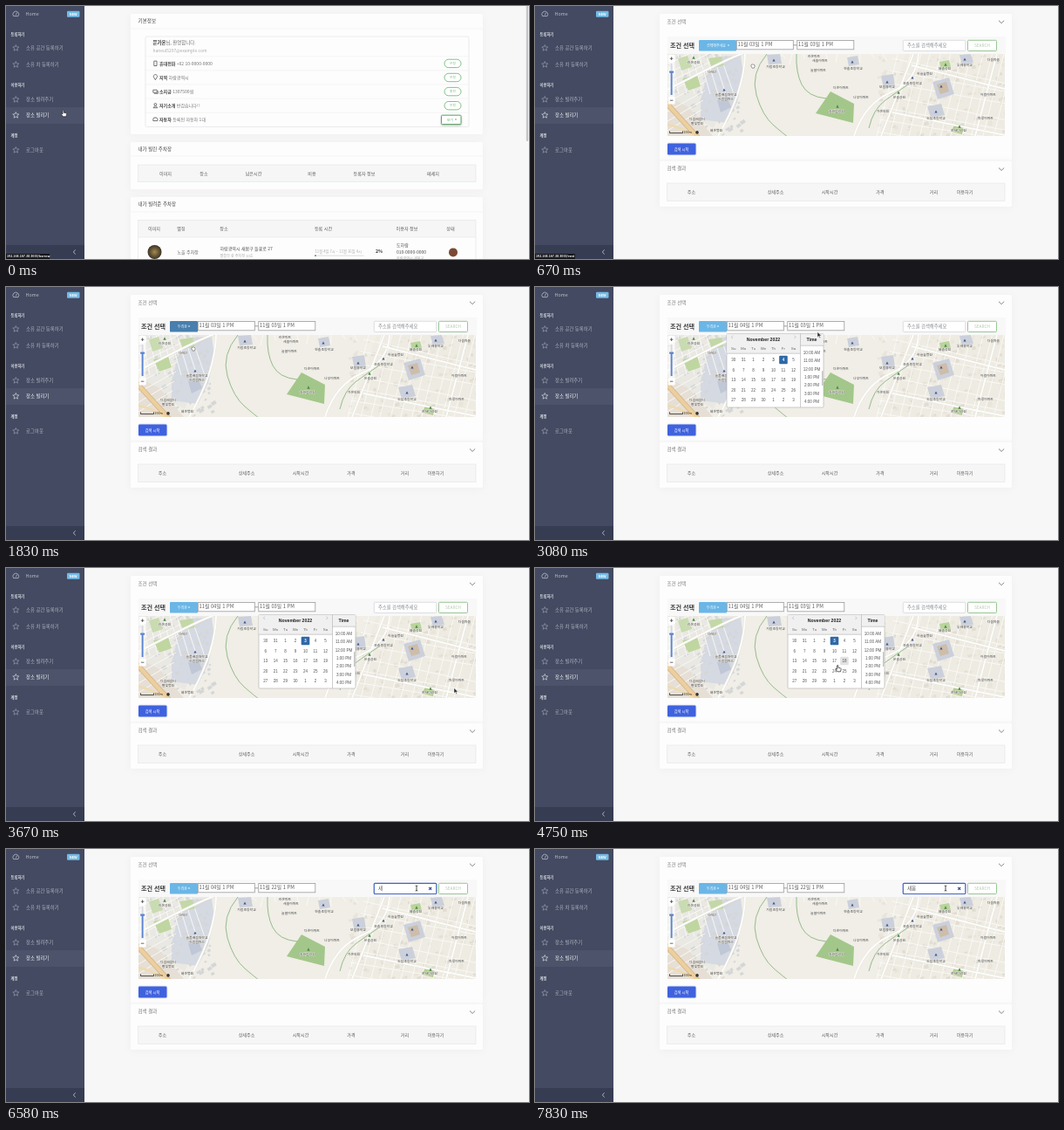
Recreate the animation shown at these times as an HTML page. Size 600x290 px, loop 8 s.

```html
<!DOCTYPE html>
<html lang="ko">
<head>
<meta charset="utf-8">
<title>주차장 빌리기</title>
<style>
  html, body { margin: 0; width: 100%; height: 100%; overflow: hidden; background: #f8f7f8; }
  svg { display: block; width: 600px; height: 290px; }
  text { font-family: "Noto Sans CJK KR", "Noto Sans", sans-serif; white-space: pre; }
  .latin text { font-family: "Liberation Sans", Arial, sans-serif; }
  .card { fill: #fdfdfd; filter: drop-shadow(0 1px 4px rgba(8, 10, 37, .035)); }
  .place { paint-order: stroke; stroke: #f6f4ee; stroke-width: .7px; }
</style>
</head>
<body>
<svg id="stage" viewBox="0 0 600 290"></svg>
<script>
const LOOP = 8000, STEP = 250 / 3;

// Markup helpers
const text = (x, y, s, size = 5.3, fill = '#5c5c5c', weight = 400, anchor = 'start') =>
  `<text x="${x}" y="${y + size * .36}" font-size="${size}" fill="${fill}" font-weight="${weight}" text-anchor="${anchor}">${s}</text>`;
const mid = (x, y, s, size, fill, weight) => text(x, y, s, size, fill, weight, 'middle');
const rect = (x, y, w, h, fill, more = '') =>
  `<rect x="${x}" y="${y}" width="${w}" height="${h}" fill="${fill}" ${more}/>`;
const path = (d, stroke, width = 1, fill = 'none') =>
  `<path d="${d}" stroke="${stroke}" stroke-width="${width}" fill="${fill}"/>`;
const poly = (points, fill) => `<polygon points="${points}" fill="${fill}"/>`;
const group = (body, more = '') => `<g ${more}>${body}</g>`;
const during = (from, to, body) => group(body, `data-from="${from}" data-to="${to}"`);
const card = (y, h) => rect(143, y, 404, h, '#fff', 'class="card" rx="1.5"');
const rule = (x1, x2, y, color = '#ececee') => path(`M${x1} ${y}H${x2}`, color, .6);
const caret = (x, y, fill = '#fff') => poly(`${x - 1.2},${y - .6} ${x + 1.2},${y - .6} ${x},${y + .9}`, fill);

function seeded(seed) {
  return () => (seed = seed * 16807 % 2147483647) / 2147483647;
}

function sidebar() {
  const item = (y, label, active) => {
    const color = active ? '#f4f5f8' : '#b0b4c1';
    let star = '';
    for (let i = 0; i < 10; i++) {
      const r = i % 2 ? 1.7 : 3.7, a = i * Math.PI / 5 - Math.PI / 2;
      star += `${i ? 'L' : 'M'}${11.3 + r * Math.cos(a)} ${y + .2 + r * Math.sin(a)}`;
    }
    return path(star + 'Z', active ? '#d9dbe3' : '#989daf', .7) + text(23, y, label, 5.4, color);
  };
  const head = (y, label) => text(5.5, y, label, 4.3, '#e2e4ea', 700);
  return rect(0, 0, 90, 290, '#434a61') + rect(0, 116, 90, 19, '#4c536a') + rect(0, 274, 90, 16, '#363c52') +
    path('M8.6 11.6A3.4 3.4 0 1 1 14 11.6ZM11.3 10.4L12.6 7.6', '#b6bac7', .8) +
    text(22.5, 9, 'Home', 5.4, '#bcc0cc') +
    rect(70, 5.7, 14.5, 7, '#74bbe6', 'rx="1"') + mid(77.2, 9.2, 'NEW', 3.9, '#fff', 700) +
    head(32, '등록하기') + item(48, '소유 공간 등록하기') + item(67, '소유 차 등록하기') +
    head(90, '이용하기') + item(107, '장소 빌려주기') + item(125, '장소 빌리기', true) +
    head(148, '계정') + item(165, '로그아웃') +
    path('M79.6 279.4L77.4 282L79.6 284.6', '#c6c9d4', .8);
}

function status(width, route) {
  return rect(0, 284, width, 6, '#15161c') + text(1, 286.8, `192.168.167.38:3000/${route}`, 3.5, '#fff', 700);
}

function tableHead(y, h, columns) {
  return rect(151.5, y, 387.5, h, '#f6f6f7', 'stroke="#e3e4e7" stroke-width=".6"') +
    columns.map(([x, label]) => mid(x, y + h / 2, label, 5.1, '#5c5c5c')).join('');
}

function profilePage() {
  const rows = [['휴대전화', '+82 10-0000-0000', '수정'], ['지역', '하람광역시', '수정'], ['소지금', '1307500원', '충전'],
    ['자기소개', '반갑습니다!!', '수정'], ['자동차', '등록된 자동차 1대', '']];
  const icons = ['M169.8 -2.7h3.2v5.4h-3.2Z', 'M171.4 2.8L169.4 -.6A2.1 2.1 0 1 1 173.4 -.6Z', 'M168.8 -1.8h4.4v3h-4.4ZM170 2.3h4.3v-3',
    'M169 2.6q2.4 -4 4.8 0ZM170 -1.2a1.3 1.3 0 1 1 2.8 0a1.3 1.3 0 1 1 -2.8 0', 'M168.8 -.4l1 -1.8h3l1 1.8v1.8h-5Z'];
  const list = rows.map(([name, value, action], i) => {
    const y = 65.8 + 16.1 * i;
    const button = action
      ? rect(503, y - 4.6, 19, 9.4, '#fff', 'rx="4.7" stroke="#62b36a" stroke-width=".8"') + mid(512.5, y, action, 3.7, '#6bb872')
      : rect(499.5, y - 5, 22.5, 10.4, '#fff', 'rx="1" stroke="#4f9f58" stroke-width=".9" style="filter:drop-shadow(0 1px 1px #0004)"') +
        mid(509.5, y, '보기', 3.7, '#5aa763') + caret(516, y, '#5aa763');
    return rule(160, 531, y - 8) + group(path(icons[i], '#555', .8), `transform="translate(0 ${y})"`) +
      `<text x="176" y="${y + 1.9}" font-size="5" fill="#777"><tspan font-weight="700" fill="#444">${name}</tspan> ${value}</text>` + button;
  }).join('');
  return card(9, 138) + text(151.5, 17, '기본정보', 5.6, '#444') + rule(143, 547, 26) +
    rect(160, 35, 371, 103.5, 'none', 'rx="1.5" stroke="#dfe0e3" stroke-width=".6"') +
    `<text x="168.5" y="44.2" font-size="5.4" fill="#666"><tspan font-weight="700" fill="#333">문가온</tspan>님, 환영합니다.</text>` +
    text(168.5, 51, 'haneul5297@example.com', 4.9, '#aaa') + list +
    card(156, 54) + text(151.5, 164, '내가 빌린 주차장', 5.5, '#444') + rule(143, 547, 172) +
    tableHead(182, 19.5, [[183, '이미지'], [227, '장소'], [284, '남은시간'], [351, '비용'], [411, '등록자 정보'], [490, '메세지']]) +
    card(219, 80) + text(151.5, 227.3, '내가 빌려준 주차장', 5.5, '#444') + rule(143, 547, 236) +
    tableHead(245.5, 19.5, [[170, '이미지'], [201, '별칭'], [250, '장소'], [364, '등록 시간'], [460, '이용자 정보'], [510, '상태']]) +
    path('M151.5 265V290M539 265V290', '#e3e4e7', .6) +
    `<circle cx="170.5" cy="282" r="8" fill="url(#photo)"/>` +
    text(196.5, 282, '노을 주차장', 5, '#666') + text(245.5, 278, '하람광역시 새봄구 들꽃로 27', 5, '#555') +
    text(245.5, 286.2, '별들의 숲 주차장 10호', 4.1, '#aaa') +
    text(354.5, 281, '11월 4일 7시 ~ 11월 16일 4시', 4.2, '#aaa') + mid(428, 281, '2%', 5.3, '#333', 700) +
    rect(354, 285.4, 57, 1.5, '#e6e8ea', 'rx=".7"') + rect(354, 285.4, 2, 1.5, '#4eac59') +
    text(448, 274, '도하람', 5, '#555') + text(448, 282, '010-0000-0000', 5, '#555') +
    text(448, 289.8, '하람광역시 새봄구', 4.1, '#aaa') +
    `<circle cx="513" cy="282.4" r="5" fill="#7a4a35"/>` +
    rect(596.8, 0, 2.4, 155, '#c4c4c6', 'rx="1.2"');
}

function map() {
  const rnd = seeded(77);
  let blocks = '', streets = '';
  for (let i = 0; i < 260; i++) {
    const left = i % 3 === 0;
    const x = left ? 152 + rnd() * 84 : 390 + rnd() * 149, y = 55 + rnd() * 94;
    const tone = left ? '#d5d6d8' : rnd() > .5 ? '#e2ddd3' : '#e9e5db';
    blocks += rect(x, y, 2 + rnd() * 4, 1.5 + rnd() * 3, tone, `transform="rotate(${left ? -32 : -16} ${x} ${y})"`);
  }
  for (let i = 0; i < 15; i++) {
    const x = 392 + i * 12 + rnd() * 4;
    streets += `M${x} 149L${x + 24} 55`;
  }
  for (let i = 0; i < 8; i++) streets += `M${410 - i * 3} ${60 + i * 14}L545 ${84 + i * 14 + rnd() * 6}`;
  for (let i = 0; i < 8; i++) streets += `M152 ${66 + i * 11}L${205 - i * 2} ${42 + i * 11}M${156 + i * 8} 55l${9 + i} 46`;
  for (let i = 0; i < 10; i++) streets += `M${282 + i * 13} 55l${-3 + rnd() * 9} ${5 + rnd() * 7}`;
  const places = [[276, 70, '가람초등학교'], [203, 76, '나래산'], [182, 65, '라온공원'], [219, 102, '늘품배움대학교'], [219, 107, '하람캠퍼스'],
    [186, 130, '다솜배움터'], [186, 135, '별빛병원'], [208, 143, '해온병원'], [320, 58, '라온마트'], [327, 63, '새솔아파트'], [325, 74, '늘봄아파트'],
    [365, 72, '한솔초등학교'], [351, 94, '다온아파트'], [346, 121, '솔바람공원'], [399, 121, '가온의원'], [374, 105, '나무아파트'],
    [404, 93, '보람중학교'], [447, 78, '하늘숲병원'], [433, 89, '은솔초등학교'], [418, 105, '은솔공원'], [460, 129, '도담초등학교'],
    [470, 72, '해솔공원'], [493, 68, '두레중학교'], [526, 62, '다움마을'], [520, 102, '아람아파트'], [517, 129, '마루아파트'], [486, 143, '온새미공원']];
  const schools = [[274, 62], [364, 64], [217, 96], [404, 87], [460, 121], [433, 82], [493, 61], [466, 92]];
  const trees = [[347, 115], [417, 99], [487, 138], [471, 67], [182, 59]];
  const marks = (list, r, fill) => list.map(([x, y]) => poly(`${x - r},${y + r} ${x + r},${y + r} ${x},${y - r}`, fill)).join('');
  const roads = 'M241 55Q240 98 210 149M152 96Q190 76 220 62T262 50M366 149Q378 112 408 99T440 55M397 149L434 55M410 122L539 148M432 68L539 95M505 149L530 55';
  const body = rect(152, 55, 387, 94, '#f0eee6') +
    poly('395,149 425,55 539,55 539,149', '#eeebe2') + poly('152,55 238,55 205,140 152,110', '#e9e8e2') +
    poly('190,130 190,108 196,84 208,58 236,57 239,78 232,110 220,134', '#d5d9e2') + blocks +
    poly('152,104 176,116 204,149 152,149', '#e6dfd6') +
    path(streets, '#fbfaf7', .9) +
    poly('169,83 186,79 190,92 176,97', '#bfd6a0') + poly('199,60 214,58 217,68 203,71', '#c3d8a6') + poly('164,60 175,57 180,70 168,74', '#c9dbb0') +
    poly('322,123 339,98 366,112 365,134', '#a3c78a') +
    poly('464,64 475,62 477,70 466,73', '#b9d49c') + poly('481,135 492,137 490,147 478,144', '#b2d08c') +
    poly('456,87 475,82 481,101 462,107', '#cbd0db') + poly('461,90 472,87 475,98 465,101', '#cdbda9') +
    poly('358,59 370,57 372,67 360,69', '#cbd0db') + poly('266,56 281,55 283,66 268,67', '#cbd0db') +
    poly('397,80 411,78 413,92 400,95', '#cbd0db') + poly('487,56 500,55 503,65 490,68', '#cbd0db') +
    poly('450,115 466,112 470,125 454,128', '#cbd0db') + poly('209,108 220,104 225,116 213,122', '#c0c7d6') +
    path(roads, '#e2dfd6', 2.6) + path(roads, '#fdfdfb', 2) +
    path('M266 55Q247 78 254 102T274 137T290 150M300 55Q299 76 306 90T334 106M383 140Q388 118 402 108T428 90', '#6fa467', .7) +
    path('M146 106L188 152', '#d6b588', 6) + path('M146 106L188 152', '#eccf9f', 4.4) + path('M152 136Q168 139 182 149', '#efdab0', 2.4) +
    marks(schools, 1.6, '#43598c') + marks(trees, 1.7, '#4d8a48') +
    group(places.map(([x, y, s]) => mid(x, y, s, 3.9, '#3c3c3c')).join(''), 'class="place"');
  const controls = rect(152.6, 56, 8, 8.5, '#fff', 'rx="1"') + rect(152.6, 104, 8, 8.5, '#fff', 'rx="1"') + rect(152.6, 64.5, 8, 39.5, '#fff9') +
    path('M154.8 60.2H158.4M156.6 58.4V62M154.8 108.2H158.4', '#444', .8) + rect(155.7, 66, 1.8, 36, '#d4d8e2') +
    rect(155.7, 76, 1.8, 26, '#5b84d0') + rect(154, 74.6, 5.2, 2.2, '#5b84d0', 'rx=".8"') +
    path('M154.5 143.4V145.6H169.5V143.4', '#222', .8) + text(170.5, 144.8, '100m', 3.6, '#222') + `<circle cx="186" cy="144.9" r="1.8" fill="#333"/>`;
  return group(body, 'clip-path="url(#mapArea)"') + controls;
}

function field(x, values) {
  return rect(x, 39.5, 65, 10.3, '#fff', 'stroke="#9c9c9c" stroke-width=".8"') +
    values.map(([from, to, day]) => during(from, to, text(x + 1.2, 44.3, `11월 ${day}일 1 PM`, 5.8, '#5c5c5c'))).join('');
}

function picker(x, from, to, picks, hover = '') {
  const dayX = i => x + 7.7 + 11.45 * i, dayY = i => 83.5 + 11.5 * i;
  const cell = (n, fill) => rect(dayX((n + 1) % 7) - 4.8, dayY(Math.floor((n + 1) / 7)) - 4.7, 9.6, 9.4, fill, 'rx="1"');
  const days = sel => Array.from({ length: 35 }, (_, i) => {
    const n = i - 1, label = n < 1 ? n + 31 : n > 30 ? n - 30 : n;
    return (n === sel ? cell(n, '#2f68a8') : '') +
      mid(dayX(i % 7), dayY(Math.floor(i / 7)), label, 4.5, n === sel ? '#fff' : '#555', n === sel || n === 3 ? 700 : 400);
  }).join('');
  const hours = [10, 11, 12, 1, 2, 3, 4].map((h, i) =>
    mid(x + 97.5, 75.2 + 9.4 * i, `${h}:00 ${i < 2 ? 'A' : 'P'}M`, 4.6, '#555')).join('');
  return during(from, to, group(
    rect(x, 53.5, 111, 84.5, '#fff', 'rx="1.2" stroke="#aeaeae" stroke-width=".6"') +
    rect(x + .3, 53.8, 84, 22.4, '#f0f0f0') + rect(x + 84.5, 53.8, 26.2, 13.4, '#f0f0f0') +
    path(`M${x} 76.2H${x + 84.5}M${x + 84.5} 53.5V138M${x + 84.5} 67.2H${x + 111}`, '#aeaeae', .6) +
    path(`M${x + 7} 55.6l-1.6 1.7l1.6 1.7M${x + 77.5} 55.6l1.6 1.7l-1.6 1.7`, '#bbb', .8) +
    mid(x + 42, 60.2, 'November 2022', 5.2, '#222', 700) + mid(x + 97.5, 60.2, 'Time', 5.2, '#222', 700) +
    ['Su', 'Mo', 'Tu', 'We', 'Th', 'Fr', 'Sa'].map((d, i) => mid(dayX(i), 70, d, 4.4, '#666')).join('') + hours +
    rect(x + 109.2, 96, 1.2, 17, '#b5b5b5', 'rx=".6"') +
    (hover && during(hover[0], hover[1], cell(hover[2], '#e2e2e2'))) +
    picks.map(([a, b, n]) => during(a, b, days(n))).join(''), 'class="latin"'));
}

function rentPage() {
  const pick = (w, label, end, fill) => rect(188, 39, w, 12.6, fill, 'rx="1.2"') +
    mid(188 + w / 2 - 1.5, 45.1, label, 4, '#fff') + caret(188 + end, 45.2);
  const chevron = y => path(`M532 ${y - 1.5}l3.1 3l3.1 -3`, '#777', .9);
  const typed = [[6170, 6580, 'ㅅ'], [6580, 6670, '새'], [6670, 6920, '새ㅂ'], [6920, 7250, '새보'], [7250, LOOP, '새봄']];
  return card(9, 167.5) + card(177.5, 52.5) +
    text(151.5, 18, '조건 선택', 5.5, '#777') + chevron(18.2) + text(151.5, 186.5, '검색 결과', 5.5, '#777') + chevron(187) +
    rect(152, 35, 388, 20, '#f8f8f8') + text(155, 45, '조건 선택', 7.1, '#3c3c3c', 700) +
    during(0, 1420, pick(43, '선택해주세요', 34, '#6ab6e6')) + during(1420, 1750, pick(43, '선택해주세요', 34, '#477fae')) +
    during(1750, 2080, pick(32, '두리온', 22, '#477fae')) + during(2080, LOOP, pick(32, '두리온', 22, '#6ab6e6')) +
    group(field(231.3, [[0, 2830, '03'], [2830, LOOP, '04']]) + path('M296.5 44.8H300.5', '#777', .7) +
      field(300.8, [[0, 5420, '03'], [5420, LOOP, '22']]), 'id="fields"') +
    rect(422.3, 39.3, 71.5, 12.2, '#fff', 'rx="1" stroke="#d4d6db" stroke-width=".8"') +
    during(5920, LOOP, rect(422.3, 39.3, 71.5, 12.2, '#fff', 'rx="1" stroke="#4265c4" stroke-width="1.2"')) +
    during(0, 6170, text(427, 45.2, '주소를 검색해주세요', 5.3, '#858a90')) +
    typed.map(([a, b, s]) => during(a, b, text(427, 45.2, s, 5.5, '#555'))).join('') +
    during(6170, LOOP, path('M485.2 43.8l3 3m0 -3l-3 3', '#27418f', 1.1)) +
    rect(496.5, 39.3, 33, 12.2, '#fff', 'rx="1" stroke="#8fc08a" stroke-width=".9"') + mid(513, 45.2, 'SEARCH', 4.8, '#b5ccb1') +
    during(500, LOOP, map()) +
    rect(152, 157.5, 32.5, 13, '#3f62de', 'rx="1.2" style="filter:drop-shadow(0 .5px 1px #3f62de44)"') + mid(168, 164, '검색 시작', 4.2, '#fff') +
    tableHead(203, 20.5, [[179.5, '주소'], [276, '상세주소'], [338, '시작시간'], [396, '가격'], [457.5, '거리'], [493, '이용하기']]) +
    during(1420, 1750, rect(188, 52.5, 56, 38, '#fff', 'rx="1.2" stroke="#d5d7dc" stroke-width=".6"') +
      rect(188.3, 63, 55.4, 13, '#e3eaf7') + text(195, 69.5, '두리온', 4.8, '#444') + text(195, 82, '마루벨', 4.8, '#444')) +
    picker(220, 2500, 3250, [[2500, 2830, 3], [2830, 3250, 4]]) +
    picker(290, 3250, 5920, [[3250, 5420, 3], [5420, 5920, 22]], [4580, 4920, 18]);
}

const pointers = {
  hand: path('M-1.5 -3.2q.7 -.9 1.4 0v2.4l2.6 .6q.8 .4 .6 1.4l-.6 2.6h-3.6l-2.2 -3q.2 -1 1.2 -.3l.6 .6Z', '#222', .7, '#fff'),
  grab: path('M-2 .1l-.1 -1.4q.6 -.8 1.1 -.2q.3 -1 1 -.5q.8 -.4 1 .4q.9 -.2 1 .6v1.5l-.7 1.6h-2.2Z', '#555', .6, '#fff'),
  arrow: path('M-2 -3.4v6l1.5 -1.4l1 2.2l1 -.5l-1 -2h2Z', '#fff', .5, '#222'),
  beam: path('M-1.3 -3q1.3 0 1.3 .8q0 -.8 1.3 -.8M0 -2.4v5M-1.3 3q1.3 0 1.3 -.8q0 .8 1.3 .8', '#222', .8)
};

// Pointer path: time, x, y and the shape used from then on
const trail = [[0, 66.5, 123, 'hand'], [170, 67, 122.5, 'hand'], [250, 67, 122.5, 'hand'], [580, 247, 72, 'grab'], [670, 250, 69, 'grab'],
  [920, 248, 67, 'grab'], [1080, 246, 66, 'grab'], [1420, 207, 46, 'hand'], [1580, 214, 68, 'hand'], [1750, 215, 71, 'grab'], [2170, 215, 71, 'grab'],
  [2420, 246, 46, 'beam'], [2500, 248, 47, 'hand'], [2750, 285, 86, 'hand'], [2920, 286, 86, 'hand'], [3080, 326, 55, 'arrow'],
  [3170, 326, 46, 'beam'], [3250, 328, 47, 'arrow'], [3670, 516, 141, 'arrow'], [3830, 516, 125, 'arrow'], [4170, 510, 112, 'arrow'],
  [4500, 378, 111, 'hand'], [4750, 348, 115, 'hand'], [5000, 321, 120, 'hand'], [5420, 321, 120, 'hand'], [5830, 471, 45, 'beam'], [LOOP, 471, 45, 'beam']];

const stage = document.getElementById('stage');
stage.innerHTML = `<defs><clipPath id="mapArea">${rect(152, 55, 387, 94, '#000')}</clipPath>
  <radialGradient id="photo"><stop offset="0" stop-color="#a58a4d"/><stop offset="1" stop-color="#3a3326"/></radialGradient></defs>` +
  rect(0, 0, 600, 290, '#f8f7f8') + during(0, 330, profilePage()) + during(330, LOOP, group(rentPage(), 'id="rent"')) + sidebar() +
  during(0, 330, status(50, 'borrow')) + during(330, 1000, status(46, 'rent')) +
  group(Object.entries(pointers).map(([name, d]) => group(d, `data-shape="${name}"`)).join(''), 'id="pointer"');

const timed = [...stage.querySelectorAll('[data-from]')].map(node => ({ node, from: +node.dataset.from, to: +node.dataset.to }));
const shapes = [...stage.querySelectorAll('[data-shape]')];
const [fields, rent, pointer] = ['fields', 'rent', 'pointer'].map(id => document.getElementById(id));

function draw(now) {
  const tick = Math.floor((now % LOOP + 4) / STEP) % 96;
  const t = Math.round(tick * STEP / 10) * 10;
  for (const { node, from, to } of timed) node.style.display = t >= from && t < to ? '' : 'none';
  fields.setAttribute('transform', `translate(${t < 1750 ? 0 : -11})`);
  rent.setAttribute('opacity', Math.min(1, Math.max(0, (t - 200) / 380)));

  const i = trail.findIndex(([at]) => at > t) - 1;
  const [t0, x0, y0, shape] = trail[i], [t1, x1, y1] = trail[i + 1];
  const p = (t - t0) / (t1 - t0), ease = p * p * (3 - 2 * p);
  pointer.setAttribute('transform', `translate(${x0 + (x1 - x0) * ease} ${y0 + (y1 - y0) * ease})`);
  for (const s of shapes) s.style.display = s.dataset.shape === shape ? '' : 'none';
}

function loop() {
  draw(performance.now());
  requestAnimationFrame(loop);
}
loop();
</script>
</body>
</html>
```
